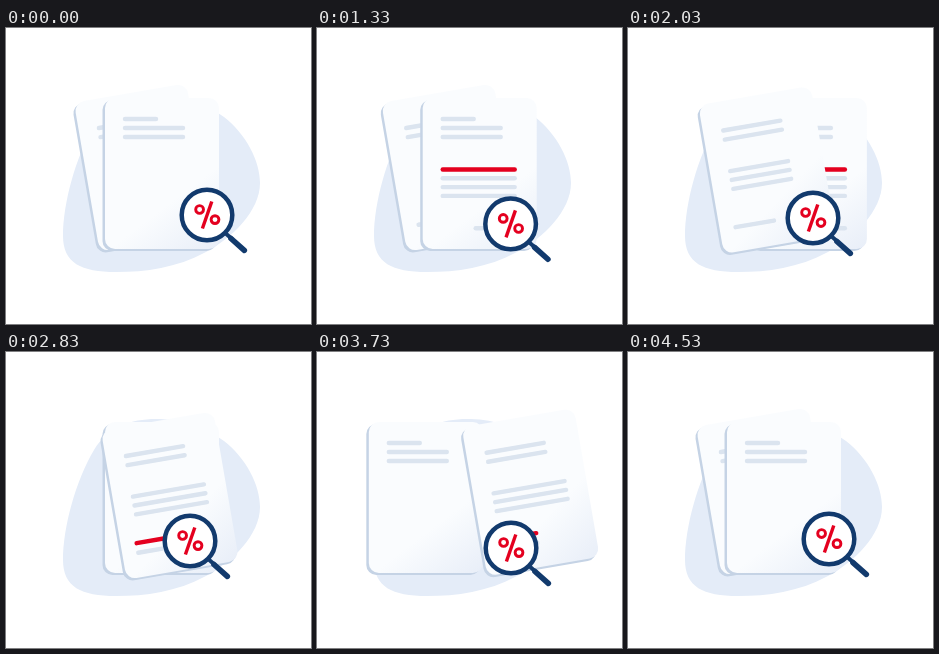
Animation of 305x296 px, one loop 4560 ms. Source, as an HTML page with a canvas:

```html
<!DOCTYPE html>
<html lang="en">
<head>
<meta charset="utf-8">
<title>Documents under a magnifier</title>
<style>
  html, body { margin: 0; width: 100%; height: 100%; overflow: hidden; background: #fff; }
  canvas { display: block; }
</style>
</head>
<body>
<canvas id="stage" width="305" height="296"></canvas>
<script>
const ctx = document.getElementById('stage').getContext('2d');
const LOOP = 4560;
const NAVY = '#123a6d', RED = '#e4001f', GREY = '#dbe4ef', RIM = '#c5d3e5';
const PAGE_W = 114, PAGE_H = 151, TILT = -9.8 * Math.PI / 180;

const blob = new Path2D(`M150 67C176 66 200 76 218 89C240 106 254 133 254 155
  C254 183 226 210 200 224C170 240 140 244 110 244C75 244 57 235 57 208
  C57 175 70 128 88 98C102 75 125 67 150 67Z`);

const paper = ctx.createLinearGradient(-PAGE_W / 2, -PAGE_H / 2, PAGE_W / 2, PAGE_H / 2);
paper.addColorStop(0, '#fafcfe');
paper.addColorStop(0.65, '#fafcfe');
paper.addColorStop(1, '#e8eef8');

// Magnifier path: time, x, y
const lensKeys = [
  [0, 201, 187], [530, 197, 193.5], [830, 195, 195.5], [1200, 194, 196.2],
  [1630, 192, 194.4], [2030, 185, 190], [2400, 183, 187.8], [2830, 184, 189],
  [3200, 189.5, 194], [3730, 194, 196], [4270, 200, 189.5], [4560, 201, 187]
];

function ease(t, start, end) {
  const u = Math.min(1, Math.max(0, (t - start) / (end - start)));
  return u * u * (3 - 2 * u);
}

const mix = (a, b, u) => a + (b - a) * u;

// Cubic Hermite curve through the keys
function lensAt(t) {
  const last = lensKeys.length - 1;
  let i = 0;
  while (i < last - 1 && t >= lensKeys[i + 1][0]) i++;
  const a = lensKeys[i], b = lensKeys[i + 1], span = b[0] - a[0];
  const u = (t - a[0]) / span, u2 = u * u, u3 = u2 * u;
  const slope = (k, axis) => {
    if (k === 0 || k === last) return 0;
    const p = lensKeys[k - 1], n = lensKeys[k + 1];
    return (n[axis] - p[axis]) / (n[0] - p[0]) * span;
  };
  return [1, 2].map(axis =>
    (2 * u3 - 3 * u2 + 1) * a[axis] + (u3 - 2 * u2 + u) * slope(i, axis) +
    (3 * u2 - 2 * u3) * b[axis] + (u3 - u2) * slope(i + 1, axis));
}

function line(x1, y1, x2, y2, color, width = 4.4) {
  ctx.strokeStyle = color;
  ctx.lineWidth = width;
  ctx.beginPath();
  ctx.moveTo(x1, y1);
  ctx.lineTo(x2, y2);
  ctx.stroke();
}

function ring(x, y, r, color, width) {
  ctx.strokeStyle = color;
  ctx.lineWidth = width;
  ctx.beginPath();
  ctx.arc(x, y, r, 0, 2 * Math.PI);
  ctx.stroke();
}

function sheet(x, y, color) {
  ctx.fillStyle = color;
  ctx.beginPath();
  ctx.roundRect(x - PAGE_W / 2, y - PAGE_H / 2, PAGE_W, PAGE_H, 10);
  ctx.fill();
}

function page(x, y, angle, drawText) {
  ctx.save();
  ctx.translate(x, y);
  ctx.rotate(angle);
  sheet(-2.5, 2, RIM);
  sheet(0, 0, paper);
  drawText();
  ctx.restore();
}

const textLine = (x, y, length, color = GREY) => line(x, y, x + length, y, color);

// A line that grows from start to end and is cleared at reset
function growing(t, start, end, reset, x, y, length, color) {
  if (t > start && t < reset) textLine(x, y, length * ease(t, start, end), color);
}

function straightPage(t, x) {
  page(x, 145.5, 0, () => {
    textLine(-37, -54.5, 31);
    textLine(-37, -45.5, 58);
    textLine(-37, -36.5, 58);
    [-4, 4.8, 13.6, 22.4].forEach((y, i) =>
      growing(t, 20, 530, 2600, -37, y, 72, i ? GREY : RED));
    growing(t, 805, 1230, 2600, -4, 54.8, 39);
  });
}

function tiltedPage(t, x, y) {
  page(x, y, TILT, () => {
    textLine(-36.7, -46.4, 58);
    textLine(-36.7, -37.2, 58);
    for (const row of [-5.2, 3.8, 12.8]) growing(t, 1690, 2160, 4450, -36.7, row, 72);
    growing(t, 2420, 2920, 4450, -41, 41.3, 39.5, RED);
    textLine(-41, 51, 39);
  });
}

function magnifier(x, y) {
  ctx.save();
  ctx.translate(x, y);
  line(17, 17, 25, 24, NAVY, 4);
  line(24, 23.5, 37.3, 35.3, NAVY, 5.6);
  ctx.fillStyle = '#fff';
  ctx.beginPath();
  ctx.arc(0, 0, 25.3, 0, 2 * Math.PI);
  ctx.fill();
  ring(0, 0, 25.3, NAVY, 4.5);
  ctx.lineCap = 'butt';
  line(4.8, -13.5, -4.6, 13.5, RED, 3.4);
  ring(-7.4, -5.5, 3.9, RED, 2.9);
  ring(8, 4.6, 3.9, RED, 2.9);
  ctx.restore();
}

function draw(t) {
  ctx.clearRect(0, 0, 305, 296);
  ctx.lineCap = 'round';
  ctx.fillStyle = '#e4ecf8';
  ctx.fill(blob);

  const out1 = ease(t, 1233, 1733), back1 = ease(t, 1733, 2250);
  const out2 = ease(t, 3363, 3863), back2 = ease(t, 3863, 4380);
  const straightX = 156 + 67 * (out1 - back1) - 57 * (out2 - back2);
  const tiltedX = 137 - 37 * out1 + 64 * back1 + 60 * out2 - 87 * back2;
  const tiltedY = 139.5 + 4 * (back1 - out2);

  // The pages trade places in depth when they are furthest apart
  const layers = [() => tiltedPage(t, tiltedX, tiltedY), () => straightPage(t, straightX)];
  if (t >= 1733 && t < 3863) layers.reverse();
  layers.forEach(layer => layer());

  magnifier(...lensAt(t));
}

const begin = performance.now();
function tick() {
  draw((performance.now() - begin) % LOOP);
  requestAnimationFrame(tick);
}
tick();
</script>
</body>
</html>
```
